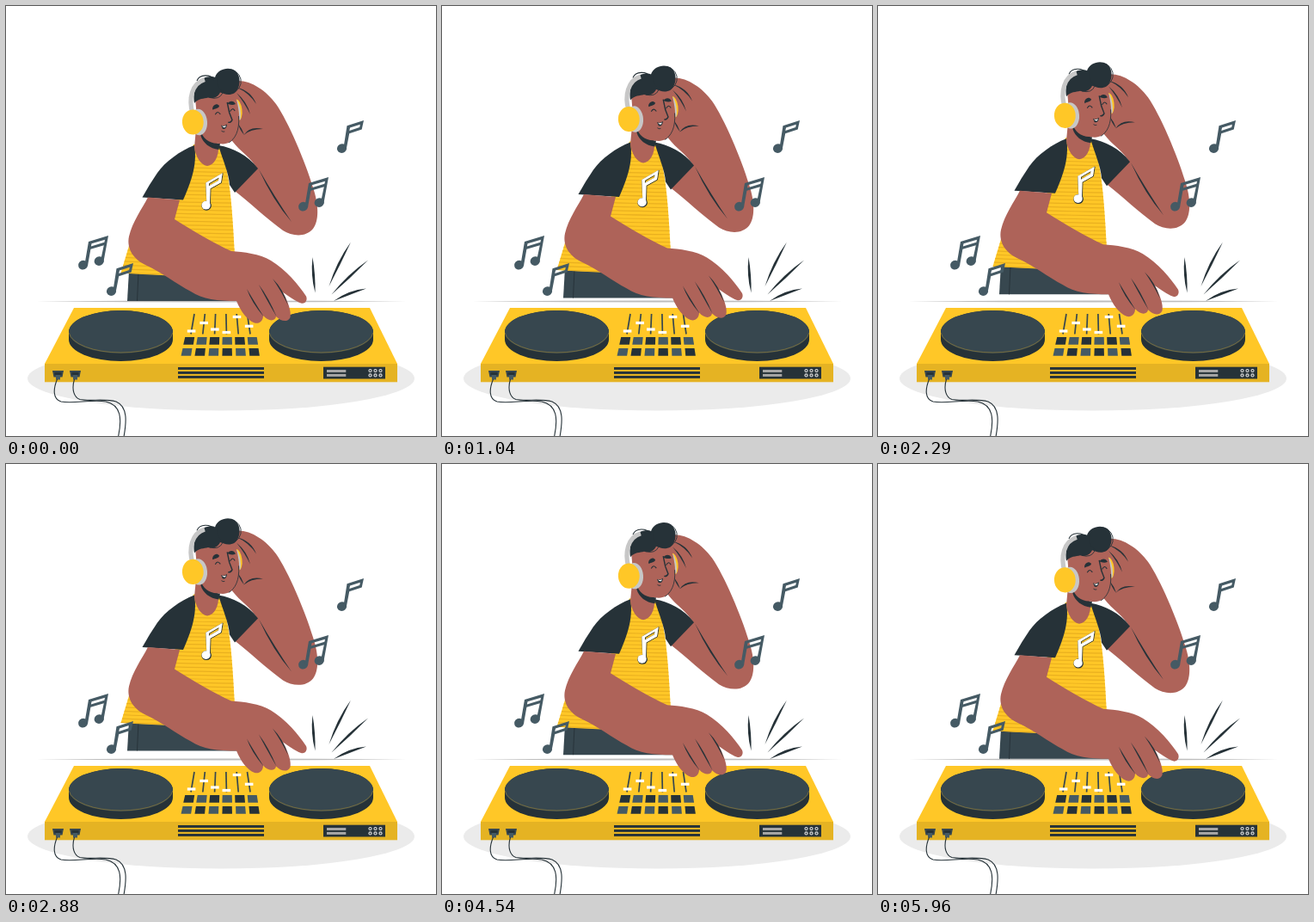
Recreate the animation shown at these times as an HTML page with a canvas. Size 500 by 500 pixels, loop 6000 ms.

```html
<!DOCTYPE html>
<html lang="en">
<head>
<meta charset="utf-8">
<title>DJ at the deck</title>
<style>
html, body { margin: 0; width: 100%; height: 100%; overflow: hidden; background: #fff; }
canvas { display: block; width: 500px; height: 500px; }
</style>
</head>
<body>
<canvas id="stage"></canvas>
<script>
const LOOP = 6000, LIFT = 10;
const YELLOW = '#ffc727', DARK = '#263238', SLATE = '#37474f',
      NOTE = '#455a64', SKIN = '#ae6359', GREY = '#c7c7c7';

const canvas = document.getElementById('stage');
const dpr = window.devicePixelRatio || 1;
canvas.width = canvas.height = 500 * dpr;
const ctx = canvas.getContext('2d');

function fill(d, color) {
  ctx.fillStyle = color;
  ctx.fill(new Path2D(d), 'evenodd');
}

function line(d, color, width) {
  ctx.strokeStyle = color;
  ctx.lineWidth = width;
  ctx.stroke(new Path2D(d));
}

function rect(x, y, w, h, color) {
  ctx.fillStyle = color;
  ctx.fillRect(x, y, w, h);
}

function oval(x, y, rx, ry, color, turn = 0) {
  ctx.fillStyle = color;
  ctx.beginPath();
  ctx.ellipse(x, y, rx, ry, turn, 0, 2 * Math.PI);
  ctx.fill();
}

// Curved stroke that narrows to a point at both ends
function taper(x1, y1, cx, cy, x2, y2, w, color = DARK) {
  const len = Math.hypot(x2 - x1, y2 - y1);
  const nx = (y1 - y2) / len * w, ny = (x2 - x1) / len * w;
  fill(`M${x1} ${y1}Q${cx + nx} ${cy + ny} ${x2} ${y2}Q${cx - nx} ${cy - ny} ${x1} ${y1}Z`, color);
}

function shifted(x, y, draw) {
  ctx.save();
  ctx.translate(x, y);
  draw();
  ctx.restore();
}

function singleNote() {
  oval(5.5, 32.6, 5.6, 5.3, NOTE, -0.4);
  fill('M11.5 6.2L31 0L28.7 10.5L14.2 15.2L10.8 33L7.3 33Z' +
       'M15 8.6L14.3 11.9L26.2 8.1L26.8 4.8Z', NOTE);
}

function doubleNote() {
  oval(5.6, 34.2, 5.6, 5.3, NOTE, -0.4);
  oval(24.2, 29.6, 5.6, 5.3, NOTE, -0.4);
  fill('M12 7L35 0L29.4 30.5L25.8 30L29.8 11.3L14.4 15.8L11 35L7.4 34Z' +
       'M15.5 9.3L14.9 12.4L30.4 7.8L31 4.7Z', NOTE);
}

function platter(x) {
  fill(`M${x - 60.5} 379A60.5 25 0 0 1 ${x + 60.5} 379V388A60.5 25 0 0 1 ${x - 60.5} 388Z`, DARK);
  oval(x, 379, 60.5, 25, SLATE);
  line(`M${x - 60.3} 380A60.5 25 0 0 0 ${x + 60.3} 380`, '#b5922f', 0.5);
}

function mixer() {
  const knobs = [378, 368.5, 376, 379.5, 361.5, 372.3];
  knobs.forEach((y, i) => {
    const top = 219 + i * 12.3, low = 215 + i * 13.8;
    line(`M${top} 358L${low} 381.5`, SLATE, 1.7);
    const x = top + (low - top) * (y - 358) / 23.5;
    rect(x - 4.8, y - 1.6, 9.6, 3.2, '#fff');
  });
  for (let row = 0; row < 2; row++) {
    for (let i = 0; i < 6; i++) {
      const x = row ? 205.5 + i * 15.4 : 208.2 + i * 14.5;
      const y = row ? 398 : 385;
      const lean = (i - 2.5) * 0.55;
      fill(`M${x} ${y}h11l${lean} 8.8h-11.6Z`, (row + i) % 2 ? NOTE : DARK);
    }
  }
}

function port(x) {
  fill(`M${x} 424H${x + 13}L${x + 11.5} 431.5H${x + 1.5}Z`, SLATE);
  rect(x + 2.5, 426, 8, 3, DARK);
  rect(x + 4, 429, 5, 5.5, NOTE);
}

function deck() {
  fill('M79 351H423L455 416H45Z', YELLOW);
  rect(45, 416, 410, 21.3, '#e5b323');
  platter(133.5);
  platter(366.5);
  mixer();
  for (let i = 0; i < 3; i++) rect(200, 420 + i * 5, 100, 2.9, DARK);
  rect(369, 419.7, 72, 13.8, DARK);
  for (let i = 0; i < 2; i++) {
    rect(373, 423 + i * 4.9, 22.3, 3, '#a6a6a6');
    for (let j = 0; j < 3; j++) {
      const x = 423.5 + j * 6, y = 424 + i * 5.4;
      oval(x, y, 2.1, 2.1, '#e0e0e0');
      oval(x, y, 1, 1, DARK);
    }
  }
  port(54);
  port(74);
  line('M59.5 434C55 445 54 457 64 460C78 463 100 457 116 460C134 464 135 480 130.5 501', DARK, 1.1);
  line('M79.5 434C76 446 79 455 86 457.5C98 460 115 456 128 460C142 466 140 484 137 501', DARK, 1.1);
}

function backdrop() {
  oval(250, 433, 225, 37.5, '#ebebeb');
  fill('M35 343.5Q250 341.6 466 343.5Q250 345.4 35 343.5Z', '#bdbdbd');
}

function raisedArm() {
  fill('M262 104C262 95 265 87 270 87C286 87 303 99 314 114C328 134 348 181 357 211' +
       'C364 232 364 250 357 259C349 269 333 268 322 261C304 248 284 229 266 215' +
       'L292 189C286 177 272 169 263 157C255 145 256 115 262 104Z', SKIN);
  taper(294, 190, 312, 225, 332, 251, 2);
}

function clothes() {
  fill('M143 308L141 343H269L260 300Z', SLATE);
  line('M154 310L152.5 343', DARK, 0.9);

  const shirt = new Path2D('M218 161L247 162C257 181 262 207 266 288L240 314' +
    'Q184 314 133.5 310.5L143 279L190 248L198 220Z');
  ctx.fillStyle = YELLOW;
  ctx.fill(shirt);
  ctx.save();
  ctx.clip(shirt);
  for (let y = 166; y < 325; y += 4.45) {
    line(`M130 ${y - 3}Q190 ${y} 275 ${y + 1}`, '#e9b01f', 1.2);
  }
  ctx.restore();

  fill('M219 162C203 168 185 181 176 194Q167 207 158.5 222.5L206 225.5C214 207 223 185 219 162Z', DARK);
  fill('M247 162C264 165 281 173 293 189L266 217L260 208C259 194 252 179 247 162Z', DARK);
}

function chestNote() {
  const shape = 'M232.3 205.5L251.7 194.3L250 205.3L237.5 212.3L237 231.5L233.4 231.5Z' +
    'M236 206.3L235.9 209.3L247 203L247.5 199.6Z';
  shifted(0.4, 0.3, () => {
    line(shape, DARK, 1);
    oval(232.7, 231.8, 5.8, 5.6, DARK);
  });
  fill(shape, '#fff');
  oval(232.6, 231.7, 5.1, 4.9, '#fff');
}

function neck() {
  fill('M221 143L219 164C220 174 226 185 234 186C242 185 248 175 247 162L243 151Z', SKIN);
  fill('M227 147C231 157 239 160 249 160L247.5 167C237 166 229 159 226.5 151Z', DARK);
}

function face() {
  oval(269, 121, 5.5, 12.5, YELLOW, -0.12);
  line('M268 110Q273 121 271.5 132', GREY, 2.2);
  fill('M220 106C231 95 256 92 265 101C269 109 271 121 271.5 134' +
       'C271.5 149 264 160 252 160.5C239 160 229 151 223 143Z', SKIN);
  line('M270.5 128C272 145 266 155 259 159', DARK, 0.8);

  fill('M240 119.5C240.5 115 245 112.5 248 116C247.5 119.5 243 119 240.5 120.8Z', DARK);
  fill('M257.5 113.5C260 109.5 265 109.7 267 114C263 116 260 114.5 257.5 113.5Z', DARK);
  line('M243.3 126.3Q246 121 249.3 126', DARK, 1.1);
  line('M260.5 122.7Q263.5 117 266.2 122', DARK, 1.1);
  line('M257.2 112L259.7 124L263 132.5Q261.5 136 258.3 135.3', DARK, 1.4);
  fill('M250 138.5Q253 140.5 257 137.5Q256.5 144 251.8 142.8Z', DARK);
  fill('M251 139.2Q253 140.5 255.8 139L255 141Q252.5 141.8 251 139.2Z', '#fff');
  line('M250.5 145.2Q252 146.7 254.3 146', DARK, 0.9);
}

function hair() {
  fill('M219 113C217 98 222 85 234 82.5C238 81.5 241 82 243 83C246 73 259 70.5 266 75' +
       'C274 81 273 95 266 101C259 105 253 102 249 100.5C246 107 240 108 235 106.5' +
       'C230 108 224 107 219 113Z', DARK);
  line('M222 87C225 79 238 79 242 86', DARK, 1.1);
  ctx.beginPath();
  ctx.ellipse(259.3, 87.7, 14, 13.7, 0.2, 0, 2 * Math.PI);
  ctx.strokeStyle = DARK;
  ctx.lineWidth = 0.9;
  ctx.stroke();
  line('M237 106.5Q248 109.5 252 101', DARK, 0.9);
}

function headphones() {
  line('M217 125C212 108 216 90 231 85.5', GREY, 5.2);
  oval(224, 135, 10, 15.2, GREY, -0.08);
  oval(217.3, 135, 12.4, 14.6, YELLOW, -0.05);
}

function handLines() {
  taper(269, 95, 284, 100, 291, 114, 1.7);
  taper(268, 101, 279, 112, 284, 126, 1.6);
  taper(270, 137, 273, 143, 277, 150, 1.6);
  taper(276.5, 150, 284, 141, 299, 143, 1.9);
}

function loweredArm() {
  fill('M165 222.5L202 225.5L196 248C218 262 244 277 262 285C276 286 295 288 308 296' +
       'C325 306 341 325 349 337.5C351 342 348 347 343 345.5C336 343 328 337 322 333' +
       'C328 344 332 355 330.5 362C327 369 319 366 314 361C313 367 305 367 299 360' +
       'C299 367 294 370 289 368.5C280 365 273 355 268 343C247 343 228 341 215 332' +
       'C198 323 180 309 164 302C148 295 140 282 143 268C147 251 158 236 165 222.5Z', SKIN);
  taper(280, 329, 287, 344, 299.5, 361, 1.6);
  taper(294, 324, 304, 340, 314.5, 361, 1.6);
  taper(310, 317, 321, 330, 328, 348, 1.6);
}

function performer() {
  raisedArm();
  clothes();
  chestNote();
  neck();
  face();
  hair();
  headphones();
  handLines();
  loweredArm();
}

function burst() {
  taper(356.5, 292, 357, 313, 359.5, 333.5, 3);
  taper(401, 274.5, 387, 298, 375.5, 326, 2.8);
  taper(421, 295.5, 399, 314, 378.5, 335.5, 2.8);
  taper(419, 328.5, 399, 333, 381, 343, 3);
}

function frame(now) {
  const t = now % LOOP;
  const up = LIFT * (1 - Math.abs(1 - 2 * t / LOOP));
  ctx.setTransform(dpr, 0, 0, dpr, 0, 0);
  rect(0, 0, 500, 500, '#fff');
  backdrop();
  deck();
  shifted(0, -up, performer);
  burst();
  shifted(385, 133, singleNote);
  shifted(117, 299, singleNote);
  shifted(340, 199, doubleNote);
  shifted(84, 267, doubleNote);
}

const start = performance.now();
function tick() {
  frame(performance.now() - start);
  requestAnimationFrame(tick);
}
tick();
</script>
</body>
</html>
```
